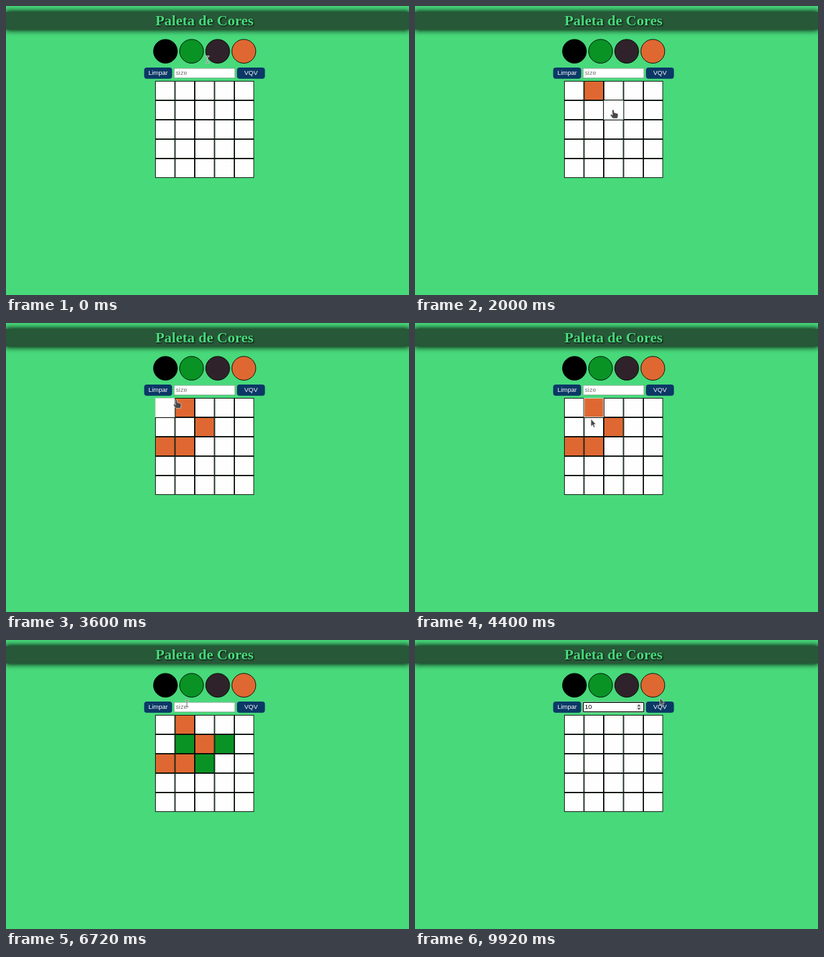
An HTML page for the animation above (10000 ms loop, 600 by 432 pixels).

```html
<!DOCTYPE html>
<html lang="pt">
<head>
<meta charset="utf-8">
<title>Paleta de Cores</title>
<style>
html, body { margin: 0; width: 100%; height: 100%; overflow: hidden; background: #48d97b; }
h1 {
  position: absolute; left: 0; top: 8.5px; width: 591px; height: 26.5px; margin: 0; padding-right: 9px;
  background: #275838; box-shadow: 0 0 9px 1px #000;
  font: bold 22px/26px "Liberation Serif", Times, serif; text-align: center;
  color: #48d97b; text-shadow: 1px 1px 2px #000;
}
svg { position: absolute; left: 0; top: 0; }
text { font: 9.5px "Liberation Sans", Arial, sans-serif; }
.button { fill: #0b3866; }
.label { fill: #fff; text-anchor: middle; }
.ring { fill: none; stroke: #000; }
#cursor { fill: #484848; stroke: #ddd; stroke-width: .7; }
</style>
</head>
<body>
<h1>Paleta de Cores</h1>
<svg width="600" height="432" viewBox="0 0 600 432">
  <g id="palette" stroke="#000" stroke-width=".9"></g>
  <rect class="button" x="205.7" y="92" width="41.6" height="16.7" rx="4"/>
  <rect class="button" x="343.9" y="92" width="41.6" height="16.7" rx="4"/>
  <text class="label" x="226.5" y="103.2">Limpar</text>
  <text class="label" x="364.7" y="103.2">VQV</text>
  <g id="clearFocus">
    <rect class="ring" x="205.5" y="91.8" width="42" height="17" rx="2" style="stroke:#fff"/>
    <rect class="ring" x="206.5" y="92.8" width="40" height="15" rx="1.5"/>
  </g>
  <rect x="250.4" y="93.2" width="90.4" height="14.2" fill="#fff" stroke="#8a9a90" stroke-width=".7"/>
  <g id="inputFocus">
    <rect class="ring" x="249.6" y="92.4" width="92" height="15.8" rx="1.5" style="stroke:#fff;stroke-width:.6"/>
    <rect class="ring" x="250.5" y="93.3" width="90.2" height="14" rx="1" stroke-width="1.3"/>
  </g>
  <g id="spinner">
    <rect x="329.5" y="95" width="8" height="10.6" fill="#efefef"/>
    <path d="M330.8 99.2 333.4 96.2 336 99.2ZM330.8 101.4H336L333.4 104.4Z" fill="#505050"/>
  </g>
  <text id="value" x="252.8" y="103.2"></text>
  <path id="caret" stroke="#000" stroke-width=".7"/>
  <g id="grid" stroke-width=".9"></g>
  <path id="cursor"/>
</svg>
<script>
const LOOP = 10000, ORANGE = '#df6832', GREEN = '#099325';
const X0 = 222.1, Y0 = 112, CW = 29.45, CH = 29;
const el = id => document.getElementById(id);

const shapes = {
  hand: 'M-1.5 1Q0-1 1.2 1L1.6 4.4 6 5.6Q7.6 6 7.4 8L6.4 13H-.5L-4 8.6Q-4.2 6.4-2.5 7.1L-1 8.2Z',
  arrow: 'M0 0V11L2.4 8.8 4.2 12.6 6 11.8 4.3 8.2 7 7.6Z',
  beam: 'M-2.5-5.5H2.5V-4.2H.6V4.2H2.5V5.5H-2.5V4.2H-.6V-4.2H-2.5Z'
};

// time, x, y, shape shown from then on
const path = [
  [0, 300, 80, 'beam'], [80, 300, 80, 'arrow'], [400, 342, 72, 'hand'],
  [640, 355, 66, 'hand'], [1080, 354, 67, 'hand'], [1300, 318, 92, 'beam'],
  [1420, 285, 112, 'hand'], [1600, 267, 126, 'hand'], [1720, 267, 126, 'hand'],
  [2000, 295, 155, 'hand'], [2200, 295, 156, 'hand'], [2480, 255, 189, 'hand'],
  [2880, 254.5, 189, 'hand'], [3080, 238, 186, 'hand'], [3280, 238, 186, 'hand'],
  [3640, 254, 112, 'beam'], [3720, 260, 92, 'arrow'], [3920, 276, 65, 'hand'],
  [4160, 276, 67, 'arrow'], [4320, 266, 128, 'arrow'], [4400, 262, 143.5, 'arrow'],
  [4440, 262, 145, 'hand'], [4560, 264, 154, 'hand'], [4680, 264, 154, 'hand'],
  [5040, 326, 155, 'hand'], [5400, 325, 155, 'hand'], [5600, 291, 177, 'hand'],
  [5680, 290, 178.5, 'hand'], [5840, 292, 180, 'hand'], [6080, 310, 112, 'beam'],
  [6200, 314, 82, 'hand'], [6400, 312, 80, 'arrow'], [6640, 280, 94, 'beam'],
  [6880, 240, 98, 'hand'], [7000, 228, 98, 'hand'], [7480, 228, 98, 'hand'],
  [7640, 250, 100, 'beam'], [7840, 266, 100, 'beam'], [8400, 266, 100, 'beam'],
  [9120, 300, 102, 'beam'], [9360, 334, 92, 'arrow'], [9600, 350, 76, 'hand'],
  [9720, 352, 76, 'arrow'], [9880, 364.5, 86.5, 'arrow'], [LOOP, 364.5, 86.5, 'arrow']
];

// time, row, column, colour
const paints = [
  [1680, 0, 1, ORANGE], [2200, 1, 2, ORANGE], [2720, 2, 1, ORANGE], [3080, 2, 0, ORANGE],
  [4600, 1, 1, GREEN], [5080, 1, 3, GREEN], [5760, 2, 2, GREEN]
];
const CLEAR = 7160, FOCUS = 7920, TYPED = [8160, 8320];

function add(parent, tag, attrs) {
  const node = document.createElementNS('http://www.w3.org/2000/svg', tag);
  for (const key in attrs) node.setAttribute(key, attrs[key]);
  return el(parent).appendChild(node);
}

['#000', GREEN, '#30222a', ORANGE].forEach((fill, i) =>
  add('palette', 'circle', { cx: 237.4 + 38.9 * i, cy: 67.7, r: 17.8, fill }));

const cells = Array.from({ length: 25 }, (_, i) => add('grid', 'rect', {
  x: X0 + CW * (i % 5) + .45, y: Y0 + CH * Math.floor(i / 5) + .45,
  width: CW - .9, height: CH - .9
}));

function pointer(t) {
  let i = path.findIndex(p => p[0] > t) - 1;
  if (i < 0) i = 0;
  const [t0, x0, y0, shape] = path[i], [t1, x1, y1] = path[i + 1];
  const u = (t - t0) / (t1 - t0), k = u * u * (3 - 2 * u);
  return { x: x0 + (x1 - x0) * k, y: y0 + (y1 - y0) * k, shape };
}

// Hover reacts slightly later than the pointer moves.
function hoveredCell(t) {
  const { x, y } = pointer(Math.max(0, t - 80));
  const col = Math.floor((x - X0) / CW), row = Math.floor((y - Y0) / CH);
  return row >= 0 && row < 5 && col >= 0 && col < 5 ? row * 5 + col : -1;
}

const show = (id, on) => el(id).setAttribute('visibility', on ? 'visible' : 'hidden');

function draw(t) {
  const hover = hoveredCell(t), fills = Array(25).fill('#fffefe');
  if (t < CLEAR)
    for (const [at, row, col, colour] of paints) if (t >= at) fills[row * 5 + col] = colour;
  cells.forEach((cell, i) => {
    cell.setAttribute('fill', fills[i]);
    cell.setAttribute('stroke', i === hover ? '#d4d4d4' : '#000');
  });

  const typed = TYPED.filter(at => t >= at).length;
  el('value').textContent = '10'.slice(0, typed) || 'size';
  el('value').setAttribute('fill', typed ? '#000' : '#757575');
  show('clearFocus', t >= CLEAR && t < FOCUS);
  show('inputFocus', t >= FOCUS);
  show('spinner', t >= 7680);
  const blinkStart = typed ? TYPED[typed - 1] : FOCUS;
  show('caret', t >= FOCUS && (t - blinkStart) % 1000 < 500);
  el('caret').setAttribute('d', `M${253 + typed * 5.3} 95.3v9.6`);

  const { x, y, shape } = pointer(t);
  el('cursor').setAttribute('d', shapes[shape]);
  el('cursor').setAttribute('transform', `translate(${x} ${y})`);
}

const start = performance.now();
(function tick() {
  draw((performance.now() - start) % LOOP);
  requestAnimationFrame(tick);
})();
</script>
</body>
</html>
```
